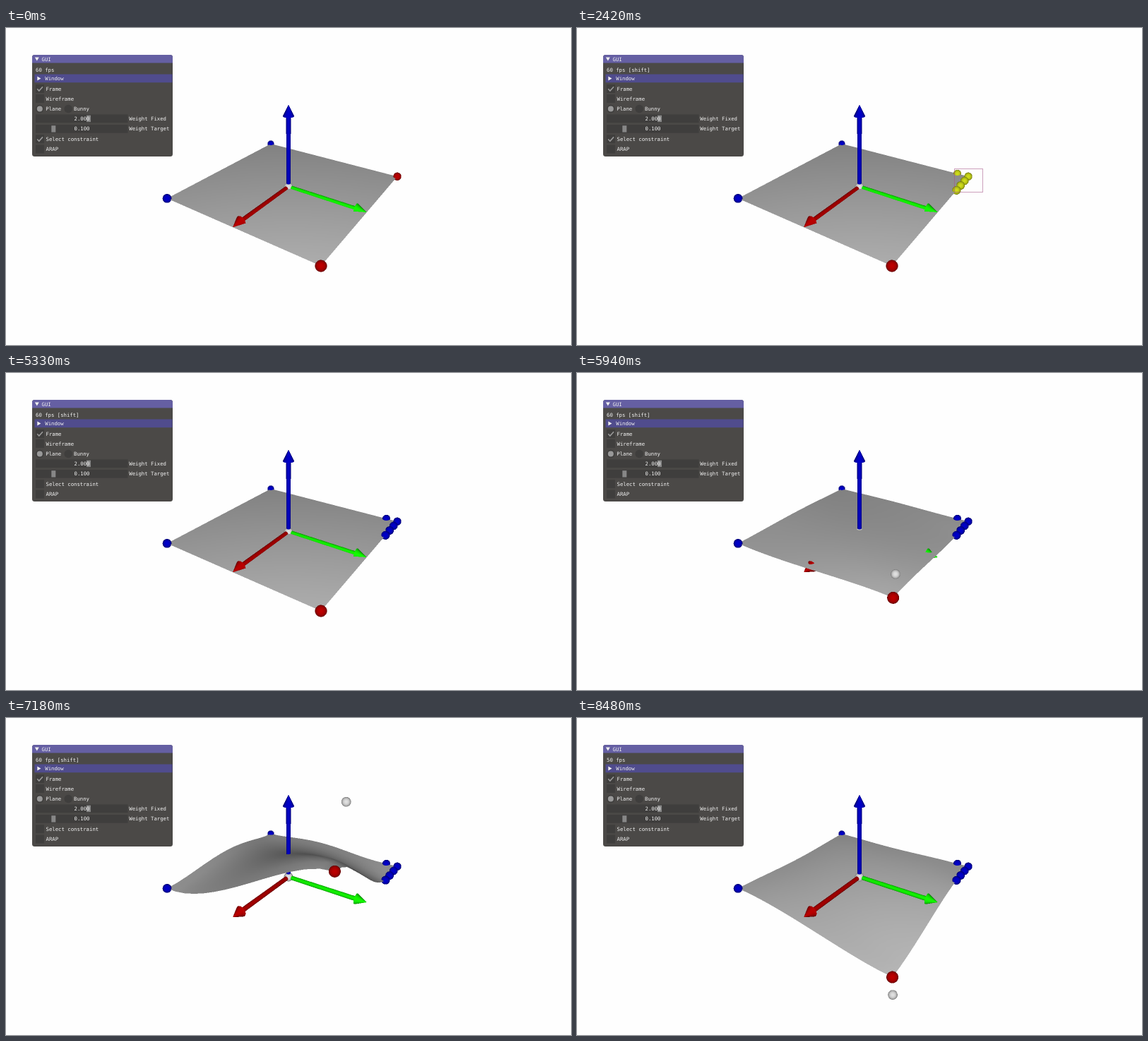
Write an HTML page with a canvas that moves like this. It is 800 by 449 pixels and loops after 9.12 s.

```html
<!DOCTYPE html>
<html>
<head>
<meta charset="utf-8">
<style>
html, body { margin: 0; width: 100%; height: 100%; overflow: hidden; background: #fefefe; }
canvas { display: block; }
</style>
</head>
<body>
<canvas id="stage" width="800" height="449"></canvas>
<script>
const LOOP = 9120;
const ctx = document.getElementById('stage').getContext('2d');

// 3D view: a small software renderer, supersampled, covering part of the stage
const S = 2, X0 = 215, Y0 = 90, W = 355 * S, H = 315 * S;
const view = document.createElement('canvas');
view.width = W;
view.height = H;
const viewCtx = view.getContext('2d');
const image = viewCtx.createImageData(W, H);
const pixels = new Uint32Array(image.data.buffer);
const depth = new Float32Array(W * H);

// Camera: orthonormal axes, with depth measured relative to the origin
const FOCAL = 117.2, DIST = 4.12;
const RIGHT = [-0.555, 0.8315, 0], DOWN = [0.403, 0.271, -0.875];
const TOWARD = [0.175, 0.12, 0.118], EYE = [2.97, 2.04, 2];

const RED = [190, 0, 0], GREEN = [20, 255, 0], BLUE = [0, 0, 205];
const WHITE = [226, 226, 226], YELLOW = [208, 222, 26], SHEET = [252, 252, 252];

const dot = (a, b) => a[0] * b[0] + a[1] * b[1] + a[2] * b[2];
const add = (a, b, s = 1) => [a[0] + b[0] * s, a[1] + b[1] * s, a[2] + b[2] * s];
const scale = (a, s) => [a[0] * s, a[1] * s, a[2] * s];
const unit = a => scale(a, 1 / (Math.hypot(...a) || 1));
const cross = (a, b) => [
  a[1] * b[2] - a[2] * b[1], a[2] * b[0] - a[0] * b[2], a[0] * b[1] - a[1] * b[0]
];

function project(p) {
  const q = 1 - dot(TOWARD, p);
  return { x: 400 + FOCAL * dot(RIGHT, p) / q, y: 225 + FOCAL * dot(DOWN, p) / q, q };
}

function vertex(p, normal) {
  const { x, y, q } = project(p);
  const light = Math.abs(dot(normal, unit(add(EYE, p, -1))));
  return { x: (x - X0) * S, y: (y - Y0) * S, near: 1 / q, light };
}

function plot(x, y, near, color, light) {
  const i = y * W + x;
  if (near <= depth[i]) return;
  depth[i] = near;
  const m = color === SHEET ? 0.3 + 0.58 * light : 0.4 + 0.6 * light;
  pixels[i] = (255 << 24 | color[2] * m << 16 | color[1] * m << 8 | color[0] * m) >>> 0;
}

function triangle(a, b, c, color) {
  const area = (b.x - a.x) * (c.y - a.y) - (c.x - a.x) * (b.y - a.y);
  if (Math.abs(area) < 1e-6) return;
  const left = Math.max(0, Math.floor(Math.min(a.x, b.x, c.x)));
  const right = Math.min(W - 1, Math.ceil(Math.max(a.x, b.x, c.x)));
  const top = Math.max(0, Math.floor(Math.min(a.y, b.y, c.y)));
  const bottom = Math.min(H - 1, Math.ceil(Math.max(a.y, b.y, c.y)));
  for (let y = top; y <= bottom; y++) {
    for (let x = left; x <= right; x++) {
      const px = x + 0.5 - a.x, py = y + 0.5 - a.y;
      const v = (px * (c.y - a.y) - (c.x - a.x) * py) / area;
      const w = ((b.x - a.x) * py - px * (b.y - a.y)) / area;
      const u = 1 - v - w;
      if (u < 0 || v < 0 || w < 0) continue;
      plot(x, y, u * a.near + v * b.near + w * c.near, color,
        u * a.light + v * b.light + w * c.light);
    }
  }
}

function ball(p, radius, color) {
  const { x, y, q } = project(p);
  const cx = (x - X0) * S, cy = (y - Y0) * S, r = radius * FOCAL / q * S;
  for (let j = Math.max(0, Math.floor(cy - r)); j <= Math.min(H - 1, cy + r); j++) {
    for (let i = Math.max(0, Math.floor(cx - r)); i <= Math.min(W - 1, cx + r); i++) {
      const d = Math.hypot(i + 0.5 - cx, j + 0.5 - cy) / r;
      if (d > 1) continue;
      const facing = Math.sqrt(1 - d * d);
      plot(i, j, 1 / (q - radius * facing / DIST), color, facing);
    }
  }
}

// Axis arrows as triangle lists
function arrow(dir, side, color) {
  const other = cross(dir, side), neck = 0.875, shaft = 0.026, head = 0.062, n = 16;
  const list = [];
  const radial = k => add(scale(side, Math.cos(k * 2 * Math.PI / n)), other, Math.sin(k * 2 * Math.PI / n));
  const at = (k, z, r, normal) => vertex(add(scale(dir, z), radial(k), r), normal);
  for (let k = 0; k < n; k++) {
    const a = radial(k), b = radial(k + 1);
    const slope = v => unit(add(v, dir, head / (1 - neck)));
    const back = scale(dir, -1);
    const p = at(k, 0, shaft, a), q = at(k + 1, 0, shaft, b);
    const r = at(k, neck, shaft, a), s = at(k + 1, neck, shaft, b);
    list.push([p, q, r, color], [q, s, r, color]);
    list.push([at(k, neck, head, slope(a)), at(k + 1, neck, head, slope(b)), at(k, 1, 0, slope(a)), color]);
    list.push([at(k, neck, head, back), at(k + 1, neck, head, back), at(k, neck, 0, back), color]);
  }
  return list;
}
const AXES = [
  ...arrow([1, 0, 0], [0, 1, 0], RED),
  ...arrow([0, 1, 0], [0, 0, 1], GREEN),
  ...arrow([0, 0, 1], [1, 0, 0], BLUE)
];

// Sheet: N x N grid; corners and a cluster near the right corner are pinned
const N = 15, BACK = 0, RIGHT_CORNER = 14, LEFT = 210, FRONT = 224;
const CLUSTER = [RIGHT_CORNER, 29, 44, 59, 13];
const rest = Array.from({ length: N * N }, (_, k) => [Math.floor(k / N) / 7 - 1, k % N / 7 - 1, 0]);

// Least-squares Laplacian deformation: how far each vertex follows the front corner
function solveWeights() {
  const size = N * N, b = new Float64Array(size);
  const A = Array.from({ length: size }, () => new Float64Array(size));
  for (let k = 0; k < size; k++) {
    const i = Math.floor(k / N), j = k % N;
    const ring = [[1, 0], [-1, 0], [0, 1], [0, -1], [1, 1], [-1, -1]]
      .map(([di, dj]) => [i + di, j + dj])
      .filter(([x, y]) => x >= 0 && y >= 0 && x < N && y < N);
    const row = [[k, 1], ...ring.map(([x, y]) => [x * N + y, -1 / ring.length])];
    for (const [p, u] of row) for (const [q, v] of row) A[p][q] += u * v;
  }
  for (const k of [BACK, LEFT, ...CLUSTER]) A[k][k] += 4;
  A[FRONT][FRONT] += 0.01;
  b[FRONT] = 0.01;
  for (let p = 0; p < size; p++) {
    for (let r = p + 1; r < size; r++) {
      const f = A[r][p] / A[p][p];
      if (!f) continue;
      for (let c = p; c < size; c++) A[r][c] -= f * A[p][c];
      b[r] -= f * b[p];
    }
  }
  for (let p = size - 1; p >= 0; p--) {
    for (let c = p + 1; c < size; c++) b[p] -= A[p][c] * b[c];
    b[p] /= A[p][p];
  }
  return b.map(v => v / b[FRONT]);
}
const weights = solveWeights();

function drawSheet(points) {
  const verts = points.map((p, k) => {
    const i = Math.floor(k / N), j = k % N;
    const at = (x, y) => points[Math.min(N - 1, Math.max(0, x)) * N + Math.min(N - 1, Math.max(0, y))];
    const normal = cross(add(at(i + 1, j), at(i - 1, j), -1), add(at(i, j + 1), at(i, j - 1), -1));
    return vertex(p, unit(normal));
  });
  for (let i = 0; i < N - 1; i++) {
    for (let j = 0; j < N - 1; j++) {
      const k = i * N + j;
      triangle(verts[k], verts[k + N], verts[k + N + 1], SHEET);
      triangle(verts[k], verts[k + N + 1], verts[k + 1], SHEET);
    }
  }
}

// Drag path: time, then pixel offset from the front corner
const DRAG = [
  [5550, 0, 0], [5940, 5, -52], [6700, 38, -237], [7030, 36, -219],
  [7150, 36, -219], [7180, 36, -218], [8060, 1, 50], [8240, 1, 55]
];

// Monotone cubic through keys
function follow(keys, t, c) {
  const last = keys.length - 1;
  if (t <= keys[0][0]) return keys[0][c];
  if (t >= keys[last][0]) return keys[last][c];
  const i = keys.findIndex(k => k[0] > t) - 1;
  const slope = j => (keys[j + 1][c] - keys[j][c]) / (keys[j + 1][0] - keys[j][0]);
  const tangent = j => {
    if (j === 0 || j === last) return 0;
    const a = slope(j - 1), b = slope(j);
    return a * b > 0 ? 2 * a * b / (a + b) : 0;
  };
  const h = keys[i + 1][0] - keys[i][0], s = (t - keys[i][0]) / h, r = 1 - s;
  return keys[i][c] * (1 + 2 * s) * r * r + keys[i + 1][c] * s * s * (3 - 2 * s)
    + h * s * r * (tangent(i) * r - tangent(i + 1) * s);
}

function dragOffset(t, gain) {
  const px = project(rest[FRONT]).q / FOCAL * gain;
  return add(scale(RIGHT, follow(DRAG, t, 1) * px), DOWN, follow(DRAG, t, 2) * px);
}

// Selection rectangles: start corner, end corner, times
const BOXES = [
  { x: 583, y: 195, toX: 539.2, toY: 227, from: 350, reach: 1090, until: 1600 },
  { x: 575, y: 200, toX: 535, toY: 233, from: 1910, reach: 2420, until: 2640 }
];

function boxAt(t) {
  const b = BOXES.find(b => t >= b.from && t < b.until);
  if (!b) return null;
  const s = Math.min(1, (t - b.from) / (b.reach - b.from)), e = s * (2 - s);
  return { left: b.x + (b.toX - b.x) * e, right: b.x, top: b.y, bottom: b.y + (b.toY - b.y) * e };
}

function inside(k, box) {
  const { x, y } = project(rest[k]);
  return x > box.left && x < box.right && y > box.top && y < box.bottom;
}

function clusterColor(k, t, box) {
  if (box && inside(k, box)) return YELLOW;
  const first = BOXES[0];
  const picked = inside(k, { left: first.toX, right: first.x, top: first.y, bottom: first.toY });
  if (t >= BOXES[1].until || (t >= first.until && picked)) return BLUE;
  return k === RIGHT_CORNER ? RED : null;
}

function drawScene(t) {
  const box = boxAt(t);
  pixels.fill(0);
  depth.fill(0);
  const pull = dragOffset(t - 100, 0.546);
  const points = rest.map((p, k) => add(p, pull, weights[k]));
  drawSheet(points);
  AXES.forEach(tri => triangle(...tri));
  ball([0, 0, 0], 0.055, WHITE);
  for (const k of [LEFT, BACK]) ball(points[k], 0.051, BLUE);
  for (const k of CLUSTER) {
    const color = clusterColor(k, t, box);
    if (color) ball(points[k], 0.051, color);
  }
  ball(points[FRONT], 0.051, RED);
  if (t > DRAG[0][0]) ball(add(rest[FRONT], dragOffset(t, 1)), 0.041, WHITE);

  viewCtx.putImageData(image, 0, 0);
  ctx.drawImage(view, X0, Y0, W / S, H / S);
  if (box) {
    ctx.strokeStyle = 'rgba(165,85,135,.55)';
    ctx.lineWidth = 1;
    ctx.strokeRect(Math.round(box.left) - 0.5, box.top - 0.5,
      box.right - Math.round(box.left), Math.round(box.bottom - box.top));
  }
}

// Control panel
const FIELD = '#3f3e3d', MARK = '#999';

function rect(x, y, w, h, color, r = 0) {
  ctx.fillStyle = color;
  ctx.beginPath();
  ctx.roundRect(x, y, w, h, r);
  ctx.fill();
}

function label(text, x, y) {
  ctx.fillStyle = '#f0f0f0';
  ctx.fillText(text, x, y + 2.6);
}

function shape(color, ...pts) {
  ctx.fillStyle = color;
  ctx.beginPath();
  pts.forEach(p => ctx.lineTo(...p));
  ctx.fill();
}

function disc(x, y, r, color) {
  rect(x - r, y - r, 2 * r, 2 * r, color, r);
}

function checkbox(text, y, checked, fill = FIELD) {
  rect(42, y - 6, 12, 12, fill);
  label(text, 56.5, y);
  if (!checked) return;
  ctx.strokeStyle = MARK;
  ctx.lineWidth = 1.6;
  ctx.beginPath();
  ctx.moveTo(44.2, y + 0.3);
  ctx.lineTo(46.8, y + 3);
  ctx.lineTo(52, y - 2.8);
  ctx.stroke();
}

function slider(text, value, y, grab) {
  rect(42, y - 5.7, 130.5, 11.6, FIELD);
  rect(grab, y - 4.6, 6, 9.4, '#878787');
  label(value, 96.5, y);
  label(text, 174.3, y);
}

function drawPanel(t) {
  ctx.font = '7.3px "DejaVu Sans Mono", monospace';
  rect(37, 38, 199, 144, '#4b4947', 3.5);
  rect(37, 38, 199, 11.5, '#655fa3', [3.5, 3.5, 0, 0]);
  shape('#f0f0f0', [40.8, 41.5], [46.8, 41.5], [43.8, 46.6]);
  label('GUI', 50.5, 44);

  const shift = (t >= 100 && t < 3000) || (t >= 5240 && t < 8390);
  const fps = t >= 8120 ? 50 : t >= 600 && t < 1700 ? 58 : 60;
  label(fps + ' fps' + (shift ? ' [shift]' : ''), 42, 59);

  rect(40.5, 65.5, 195, 11.8, '#504c8d');
  shape('#f0f0f0', [44.3, 68.4], [49.4, 71.4], [44.3, 74.4]);
  label('Window', 55.3, 71.4);

  checkbox('Frame', 86, true);
  checkbox('Wireframe', 100, false);
  disc(47.8, 114.5, 5.8, FIELD);
  disc(47.8, 114.5, 4, MARK);
  label('Plane', 56.3, 114.5);
  disc(88.2, 114.5, 5.8, FIELD);
  label('Bunny', 96, 114.5);
  slider('Weight Fixed', '2.000', 128.3, 114);
  slider('Weight Target', '0.100', 142.8, 64.3);

  const hover = t >= 3360 && t < 4030;
  const fill = !hover ? FIELD : t < 3850 ? '#575654' : '#636260';
  checkbox('Select constraint', 157.2, t < 4030, fill);
  checkbox('ARAP', 171.5, false);
}

function frame() {
  const t = performance.now() % LOOP;
  ctx.fillStyle = '#fefefe';
  ctx.fillRect(0, 0, 800, 449);
  drawScene(t);
  drawPanel(t);
  requestAnimationFrame(frame);
}
requestAnimationFrame(frame);
</script>
</body>
</html>
```
